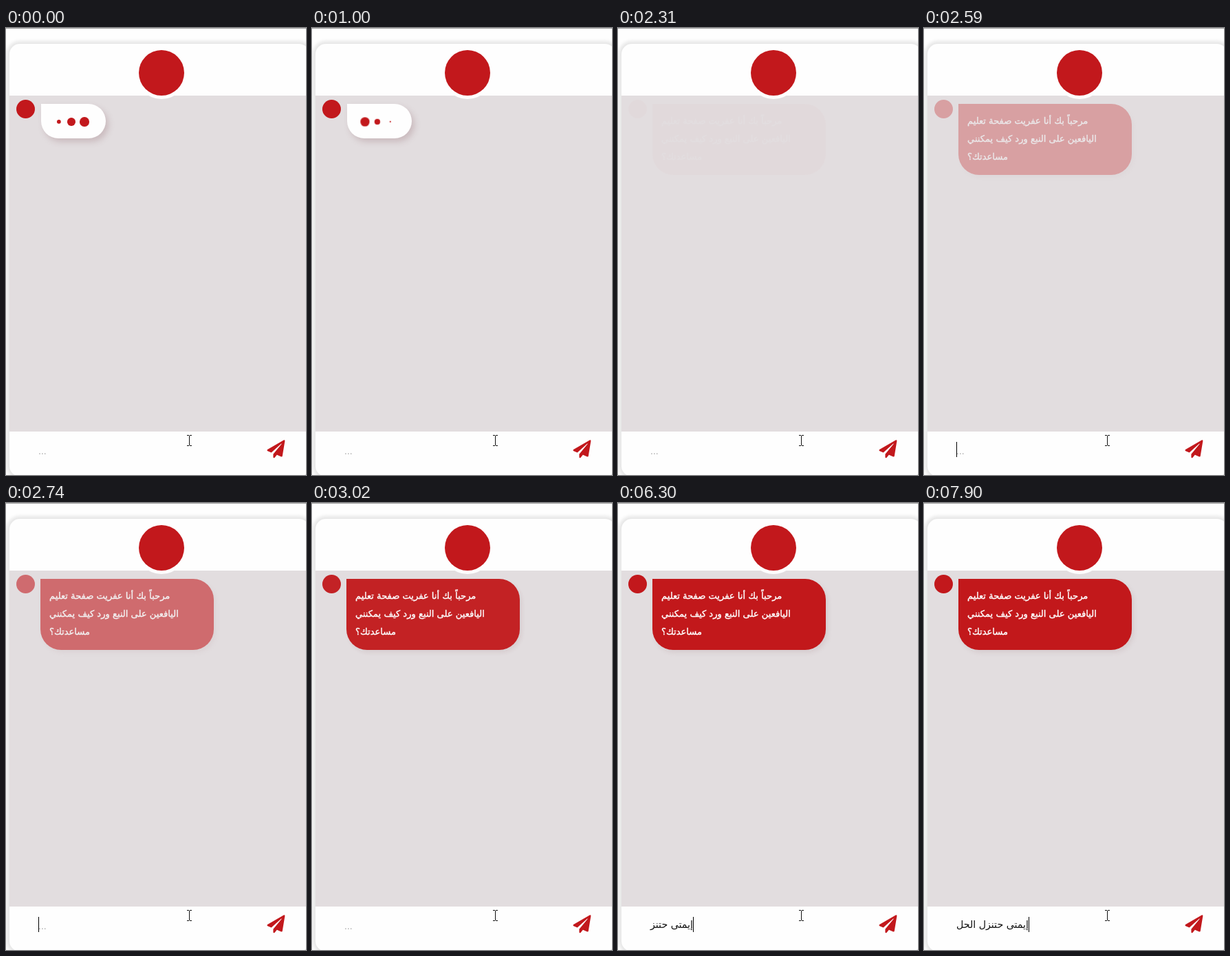
Write an HTML page that moves like this. It is 436 by 648 pixels and loops after 8 s.

```html
<!DOCTYPE html>
<html lang="ar">
<head>
<meta charset="utf-8">
<title>Chat</title>
<style>
  html, body { margin: 0; width: 100%; height: 100%; overflow: hidden; background: #fefefe; }
  #stage { position: relative; width: 436px; height: 648px; overflow: hidden; --t: 0; }
  #stage div, #stage svg { position: absolute; }
  .rule { left: 0; top: 0; width: 436px; height: 1px; background: #a3a3a3; }
  .card {
    left: 5px; top: 23px; width: 436px; height: 627px; border-radius: 15px;
    background: #fefefe; box-shadow: 0 0 5px 4px #e6e6e6;
  }
  .chat { left: 5px; top: 98px; width: 431px; height: 487px; background: #e2dddf; }
  .ring { left: 189px; top: 29px; width: 74px; height: 74px; border-radius: 50%; background: #fefefe; }
  .logo { left: 193px; top: 32px; width: 66px; height: 66px; border-radius: 50%; background: #c2181c; }
  .avatar { left: 15px; top: 104px; width: 27px; height: 27px; border-radius: 50%; background: #c2181c; }

  .bubble { top: 110px; border-radius: 0 30px 30px 30px; }
  .waiting .bubble {
    left: 51px; width: 94px; height: 50px; background: #fefefe;
    box-shadow: 4px 5px 9px rgba(150, 110, 115, .3);
  }
  .dot {
    left: calc(18.5px + var(--i) * 18.55px); top: 18.5px;
    width: 13.5px; height: 13.5px; border-radius: 50%; background: #c2181c;
    animation: pulse 1.4s ease-in-out infinite both paused;
    animation-delay: calc((var(--t) + 868 - var(--i) * 160) * -1ms);
  }
  @keyframes pulse {
    0%, 80%, 100% { transform: scale(0); }
    40% { transform: scale(1); }
  }

  .reply {
    animation: appear 940ms ease-in-out both paused;
    animation-delay: calc((2230 - var(--t)) * 1ms);
  }
  @keyframes appear { from { opacity: 0; } to { opacity: 1; } }
  .reply .bubble {
    left: 50px; width: 252px; height: 103px; box-sizing: border-box; padding: 12px 13px;
    background: #c2181b; color: #fff; box-shadow: 3px 4px 6px rgba(170, 140, 143, .2);
    font: 13.1px/26px "DejaVu Sans", sans-serif; white-space: nowrap;
    -webkit-text-stroke: .4px #fff;
  }
  .reply bdi { display: block; direction: rtl; width: max-content; }

  .hint { left: 47px; top: 602px; font: 14px/22px "Liberation Sans", sans-serif; color: #aaa; }
  .field { left: 47px; top: 600px; display: flex; font: 14.2px/22px "DejaVu Sans", sans-serif; color: #111; }
  .field bdi { white-space: pre; direction: rtl; }
  .field i { width: 1px; height: 22px; background: #000; }
</style>
</head>
<body>
<div id="stage">
  <div class="card"></div>
  <div class="rule"></div>
  <div class="chat"></div>
  <div class="ring"></div>
  <div class="logo"></div>

  <div class="waiting">
    <div class="avatar"></div>
    <div class="bubble">
      <div class="dot" style="--i:0"></div>
      <div class="dot" style="--i:1"></div>
      <div class="dot" style="--i:2"></div>
    </div>
  </div>

  <div class="reply">
    <div class="avatar"></div>
    <div class="bubble">
      <bdi>مرحباً بك أنا عفريت صفحة تعليم</bdi>
      <bdi>اليافعين على النبع ورد كيف يمكنني</bdi>
      <bdi>مساعدتك؟</bdi>
    </div>
  </div>

  <div class="hint">...</div>
  <div class="field"><bdi></bdi><i></i></div>

  <svg width="436" height="648" viewBox="0 0 436 648">
    <path fill="#c2181c" transform="translate(379.5 597.3) scale(.0505)"
      d="M476 3.2L12.5 270.6c-18.1 10.4-15.8 35.6 2.2 43.2L121 358.4l287.3-253.2c5.5-4.9 13.3 2.6 8.6 8.3L176 407v80.5c0 23.6 28.5 32.9 42.5 15.8L282 426l124.6 52.2c14.2 6 30.4-2.9 33-18.2l72-432C515 7.8 493.3-6.8 476 3.2z"/>
    <path d="M263 590.5h3M267 590.5h3M266.5 591v14M263 605.5h3M267 605.5h3" fill="none" stroke="#111"/>
  </svg>
</div>
<script>
  const LOOP = 8000, BLINK = 530, SWAP = 2230;
  const message = "إيمتى حتنزل الحل";
  // One time per typed letter
  const keys = [3790, 4220, 4500, 4800, 4940, 5080, 5690, 6000,
                6150, 6300, 6580, 6720, 6870, 7010, 7160, 7900];

  const find = s => document.querySelector(s);
  const stage = find("#stage"), waiting = find(".waiting"), hint = find(".hint");
  const typed = find(".field bdi"), caret = find(".field i");
  const show = (el, on) => { el.style.visibility = on ? "visible" : "hidden"; };

  function caretOn(t) {
    if (t >= keys[0]) return t < 7750 || t >= 7900;
    return t >= 300 && (t - 300) % (2 * BLINK) < BLINK;
  }

  function draw(now) {
    const t = now % LOOP;
    const text = message.slice(0, keys.filter(k => k <= t).length);
    stage.style.setProperty("--t", t.toFixed(1));
    show(waiting, t < SWAP);
    show(hint, !text);
    show(caret, caretOn(t));
    if (typed.textContent !== text) typed.textContent = text;
    requestAnimationFrame(draw);
  }

  draw(performance.now());
</script>
</body>
</html>
```
